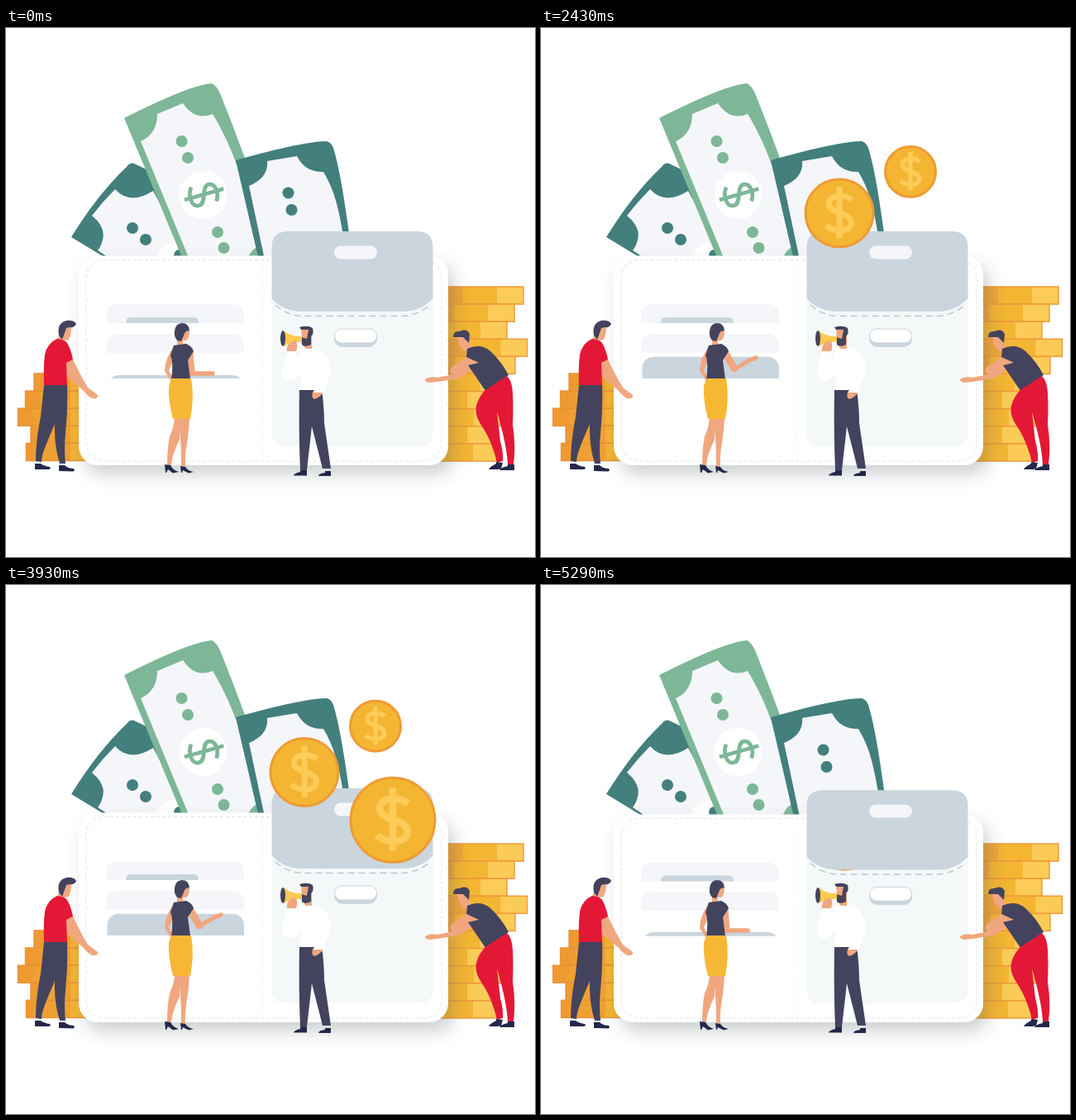
These frames come from a looping animation (640 by 640 pixels, 5.37 s). An HTML page:

```html
<!DOCTYPE html>
<html lang="en">
<head>
<meta charset="utf-8">
<title>Wallet</title>
<style>
  html, body { margin: 0; width: 100%; height: 100%; overflow: hidden; background: #fff; }
  svg { display: block; width: 100vw; height: 100vh; }
  .skin { fill: #f0a77f; }
  .navy { fill: #43435e; }
  .shoe { fill: #23284a; }
  .red { fill: #e31836; }
  .teal { fill: #427f7d; }
  .green { fill: #7db797; }
  .paper { fill: #f5f6f9; }
  .grey { fill: #cbd5de; }
  .white { fill: #fff; }
  .stitch { fill: none; stroke: #dfe4e7; stroke-dasharray: 4 3; }
  .limb { fill: none; stroke: #f0a77f; stroke-linecap: round; stroke-linejoin: round; }
</style>
</head>
<body>
<svg viewBox="0 0 640 640">
  <defs>
    <filter id="shade" x="-10%" y="-10%" width="130%" height="135%">
      <feDropShadow dx="7" dy="11" stdDeviation="10" flood-color="#4d5658" flood-opacity=".28"/>
    </filter>
    <clipPath id="slot"><path d="M100 380H300V424H100Z"/></clipPath>
    <g id="dollar" fill="none">
      <path d="M0 -40V38M19 -20C8 -29 -16 -29 -16 -14C-16 1 18 -2 18 14C18 30 -8 29 -20 19"/>
    </g>
  </defs>

  <!-- banknotes -->
  <g>
    <path class="teal" d="M79 253Q111 201 146 168Q150 162 155 164L178 175L225 290H140Z"/>
    <path class="paper" d="M104 227Q121 241 117 256Q115 264 111 269L142 290H228L178 197Q150 215 132 195Q117 210 104 227Z"/>
    <circle class="white" cx="204" cy="284" r="24"/>
    <g class="teal">
      <circle cx="153" cy="242" r="7"/><circle cx="169" cy="256" r="7"/><circle cx="210" cy="275" r="7"/>
    </g>
  </g>
  <g>
    <path class="green" d="M143 109Q222 69 249 67Q254 69 259 79Q275 119 290 160L312 290H218Z"/>
    <path class="paper" d="M163 137Q183 128 183 104L214 91Q229 113 250 104Q266 130 279 165L310 290H226Z"/>
    <circle class="white" cx="238.500" cy="202" r="29"/>
    <use href="#dollar" stroke="#7db797" stroke-width="7.500" transform="translate(239 201.500) rotate(74) scale(.63)"/>
    <g class="green">
      <circle cx="212.500" cy="137" r="7"/><circle cx="220" cy="157" r="7"/>
      <circle cx="256" cy="247" r="7"/><circle cx="263.500" cy="266" r="7"/>
      <circle cx="313" cy="284" r="21"/>
    </g>
  </g>
  <g>
    <path class="teal" d="M278 160Q360 137 388 137Q393 138 396 145C404 172 409 205 417 262L420 290H308Z"/>
    <path class="paper" d="M294 191Q318 181 316 161L352 155Q362 175 384 174C398 198 402 215 410 262V290H315Z"/>
    <g class="teal"><circle cx="341.500" cy="199.500" r="7"/><circle cx="345.500" cy="220" r="7"/></g>
  </g>

  <g id="stacks" stroke-width="1.500"></g>

  <g id="wallet">
    <rect class="white" x="88" y="275.500" width="447" height="253.500" rx="23" filter="url(#shade)"/>
    <rect class="stitch" x="97" y="280.500" width="430" height="243.500" rx="22"/>
    <path class="stitch" d="M310 281V523" style="stroke:#eceff1;stroke-dasharray:2 2"/>
    <path class="paper" d="M121 357V348Q121 334 136 334H273Q288 334 288 348V357ZM121 393V384Q121 370 136 370H273Q288 370 288 384V393Z"/>
    <path class="grey" d="M145 357Q145 350 151 350H227Q233 350 233 357Z"/>
    <g clip-path="url(#slot)"><rect id="card" class="grey" x="122.500" width="165.500" height="50" rx="14"/></g>

    <rect x="321.500" y="300" width="195" height="205.500" rx="14" fill="#f4f8f9"/>
    <g id="inside"></g>
    <path class="grey" d="M321.500 327V265Q321.500 246 341 246H497Q516.500 246 516.500 265V327Q505 341 484 343H354Q333 341 321.500 327Z"/>
    <path d="M326 335Q339 347 357 348.500H482Q501 346 513 335" fill="none" stroke="#bfc8cd" stroke-width="1.500" stroke-dasharray="8 5"/>
    <rect class="paper" x="397" y="263.500" width="52" height="16" rx="8"/>
    <rect class="grey" x="397" y="364" width="52" height="22" rx="10"/>
    <rect class="white" x="397.500" y="364" width="51" height="17" rx="8.500" stroke="#cbd5de"/>
  </g>

  <g id="coins"></g>

  <!-- man on the left -->
  <g>
    <path class="skin" d="M67 404L81 401Q90 420 99 435L111 444Q112 449 104 448Q97 444 94 439L73 421Z"/>
    <path class="skin" d="M69 361H79Q79 370 76 377L71 378L70 384L61 379Z"/>
    <path class="navy" d="M64 372Q61 357 73 354Q82 353 85 358Q83 363 77 362L73 363Q71 369 68 377Z"/>
    <path class="red" d="M62 376Q71 377 74 381Q79 390 81 401L73 405L74 433H46Q45 410 47 395Q50 381 62 376Z"/>
    <path class="navy" d="M46 432H74Q75 460 72 490Q70 510 72 527L65 527Q58 505 59 479Q52 495 47 508Q43 518 43 525L36 524Q36 500 42 470Q44 450 46 432Z"/>
    <path class="shoe" d="M35 527H42Q46 530 53 531Q55 533 52 534H35ZM64 529H71Q75 533 82 533Q84 536 81 536.500L64 536Z"/>
  </g>

  <!-- woman -->
  <g>
    <path class="skin" d="M204 472H210V498Q201 516 200 529L195 529Q195 508 198 494Q203 483 204 472ZM209 472H222Q221 490 219 502Q216 518 217 531L212 530Q212 510 211 498Z"/>
    <path class="shoe" d="M192 528L199 529Q202 535 209 537L202 538.500L196 534L194 538H193ZM211 530L217 531Q220 536 227 537L221 538.500L214 535L213 538H212Z"/>
    <path class="skin" d="M204 384Q192 400 192 415L199 426L202 424L197 414Q201 406 204 399Z"/>
    <path class="skin" d="M213 366L222 365Q222 376 218 378L214 378V385H207V377Z"/>
    <path class="navy" d="M204 367Q205 357 213 357Q221 357 222 366Q216 366 215 372L212 379L207 378Q203 373 204 367Z"/>
    <path id="upper" class="limb" stroke-width="9"/>
    <path id="fore" class="limb" stroke-width="5.500"/>
    <path class="navy" d="M203 384Q211 383 218 382Q225 385 227 391L220 402L223 425H200Q203 405 199 396Z"/>
    <path fill="#f6b734" d="M200 424H224Q228 447 223 473H202Q196 451 197 433Z"/>
  </g>

  <!-- man with megaphone -->
  <g>
    <path class="navy" d="M355 437H382Q385 460 385 478L393 533H383L370 482L364 535H356Q354 490 355 437Z"/>
    <path class="white" d="M355 387Q363 389 371 386Q384 387 390 402Q397 413 390 425L383 443L371 441L373 438H355L357 419L348 426Q336 430 334 419Q335 402 341 393L350 392L354 399Z"/>
    <path class="skin" d="M371 441L383 441Q380 447 373 449Q369 447 371 441Z"/>
    <path class="skin" d="M357 363H370L370 388H362L358 376Z"/>
    <path class="navy" d="M355 362Q365 359 371 363Q373 370 369 373L369 383Q361 387 358 383L357 374L364 376L366 365H357Z"/>
    <path fill="#fcca50" d="M336 366Q345 374 358 373V380Q346 379 336 385Z"/>
    <ellipse class="navy" cx="335" cy="375.500" rx="3" ry="9.500"/>
    <path class="skin" d="M340 391Q339 386 343 381L350 378Q354 382 351 391Z"/>
    <path class="shoe" d="M356 535H364V541.500H348Q348 539 356 537ZM386 536H393V542H378Q378 539 386 538Z"/>
  </g>

  <!-- man on the right -->
  <g>
    <path class="skin" d="M558 397L573 405Q560 418 547 424Q525 428 513 429Q506 428 507 425Q513 421 522 423L541 419Q534 415 541 409Z"/>
    <path class="skin" d="M546 374L558 372L563 389L557 392Q548 389 546 374Z"/>
    <path class="navy" d="M541 374Q541 366 549 367Q557 363 561 370L560 381L553 374Z"/>
    <path class="navy" d="M558 388Q574 381 586 391Q600 404 608 420L580 439Q570 424 559 408L572 405L557 398Z"/>
    <path class="red" d="M580 438L606 421Q612 426 613 441Q614 460 613 480Q617 505 614 528H607Q606 505 594 464L598 500Q602 514 601 524L594 526Q588 500 576 482Q565 466 570 454Q573 445 580 438Z"/>
    <path class="shoe" d="M593 525L601 526L599 533L595 534L584 534Q585 531 593 527ZM607 528H615V535H597Q598 532 607 530Z"/>
  </g>
</svg>

<script>
const $ = id => document.getElementById(id);
const make = (parent, tag, attrs) => {
  const el = document.createElementNS("http://www.w3.org/2000/svg", tag);
  for (const k in attrs) el.setAttribute(k, attrs[k]);
  parent.append(el);
  return el;
};

// stacked coins: each row is a box with a shaded or lit end
const ROW = 21.1;
const block = (x, y, w, fill, stroke = "none") =>
  make($("stacks"), "rect", { x, y, width: w, height: ROW, fill, stroke });
[34, 23.5, 14.5, 30, 24.5].forEach((x, i) => {
  const y = 418 + i * ROW;
  block(x, y, 100 - x, "#efa033");
  block(x, y, 18, "#ee9a31");
  block(78, y, 22, "#f3b234");
  block(x, y, 100 - x, "none", "#e8923a");
});
[626, 615, 606, 630.5, 616, 605, 590, 598, 590, 597].forEach((x, i) => {
  const y = 313 + i * ROW;
  block(520, y, x - 520, "#f4b533");
  block(520, y, Math.max(0, x - 593), "#efa438");
  block(x - 32, y, 32, "#fbcb57");
  block(520, y, x - 520, "none", "#ed9a3c");
});

const ease = {
  sine: u => (1 - Math.cos(Math.PI * u)) / 2,
  out: u => 1 - (1 - u) ** 2.2,
  in: u => u ** 2.5
};

// keys: [time, value, easing towards the next key]
function track(keys, t) {
  if (t <= keys[0][0]) return keys[0][1];
  for (let i = 1; i < keys.length; i++) {
    const [a, va, e = "sine"] = keys[i - 1], [b, vb] = keys[i];
    if (t < b) return va + (vb - va) * ease[e]((t - a) / (b - a));
  }
  return keys[keys.length - 1][1];
}

const LOOP = 5370, STEP = 500 / 7, LAST = 74, FLOOR = 530;
const lift = [[71, 0], [785, 1], [4050, 1], [4764, 0]];
const pop = [[0, 1.039], [180, .986], [360, 1.01], [540, 1]];
const land = [[4640, 1], [4930, .985], [5080, 1.008], [5280, .992]];

const coins = [
  { x: [[0, 447]], r: 32, from: 1070, to: 4990, y: [
    [1070, 268, "out"], [1700, 158], [2300, 175], [2870, 166], [3560, 176],
    [4350, 164], [4400, 164, "in"], [5000, 285]] },
  { x: [[4600, 361], [5110, 367.5]], r: 42.5, from: 1856, to: LOOP, tuck: 5110, y: [
    [1856, 290, "out"], [2290, 221], [2430, 224], [2820, 229], [3214, 224],
    [3640, 229], [4350, 222], [4600, 223, "in"], [5110, 301.8]] },
  { x: [[0, 468]], r: 52.5, from: 2642, to: 4920, y: [
    [2642, 298, "out"], [2960, 279], [3214, 285], [3540, 290],
    [4200, 281], [4571, 282, "in"], [4930, 298]] }
];
for (const c of coins) {
  c.el = make($("coins"), "g", {});
  make(c.el, "circle", { r: c.r - 1.5, fill: "#f4b533", stroke: "#ee9b35", "stroke-width": 3 });
  make(c.el, "use", { href: "#dollar", stroke: "#fdcb57", "stroke-width": 9, transform: `scale(${c.r / 53.5})` });
}

function bounce(t) {
  if (t >= land[0][0]) return track(land, t);
  const last = coins.filter(c => t >= c.from).pop();
  return last ? track(pop, t - last.from) : 1;
}

function draw(t) {
  const up = track(lift, t), mix = (a, b) => a + (b - a) * up;
  const stretch = bounce(t);
  $("wallet").setAttribute("transform", `translate(0 ${FLOOR}) scale(1 ${stretch}) translate(0 -${FLOOR})`);
  // the held card keeps its height while the wallet bounces
  $("card").setAttribute("y", FLOOR - (FLOOR - mix(420, 397.7)) / stretch);

  const ex = mix(224, 234), ey = mix(417, 412), hx = mix(250, 260), hy = mix(418, 399);
  $("upper").setAttribute("d", `M222 392L${ex} ${ey}`);
  $("fore").setAttribute("d", `M${ex} ${ey + 1}L${mix(240, 251)} ${mix(418, 402.5)}L${hx} ${hy}`);

  for (const c of coins) {
    const home = t >= c.tuck ? $("inside") : $("coins");
    if (c.el.parentNode !== home) home.append(c.el);
    c.el.setAttribute("visibility", t >= c.from && t < c.to ? "visible" : "hidden");
    c.el.setAttribute("transform", `translate(${track(c.x, t)} ${track(c.y, t)})`);
  }
}

// motion runs at 14 poses a second, on a 10 ms clock
function pose(t) {
  let n = Math.round(t / STEP);
  if (Math.round(n * STEP / 10) * 10 > t) n--;
  return Math.min(n, LAST) * STEP;
}

const start = performance.now();
function tick() {
  draw(pose((performance.now() - start) % LOOP));
  requestAnimationFrame(tick);
}
tick();
</script>
</body>
</html>
```
